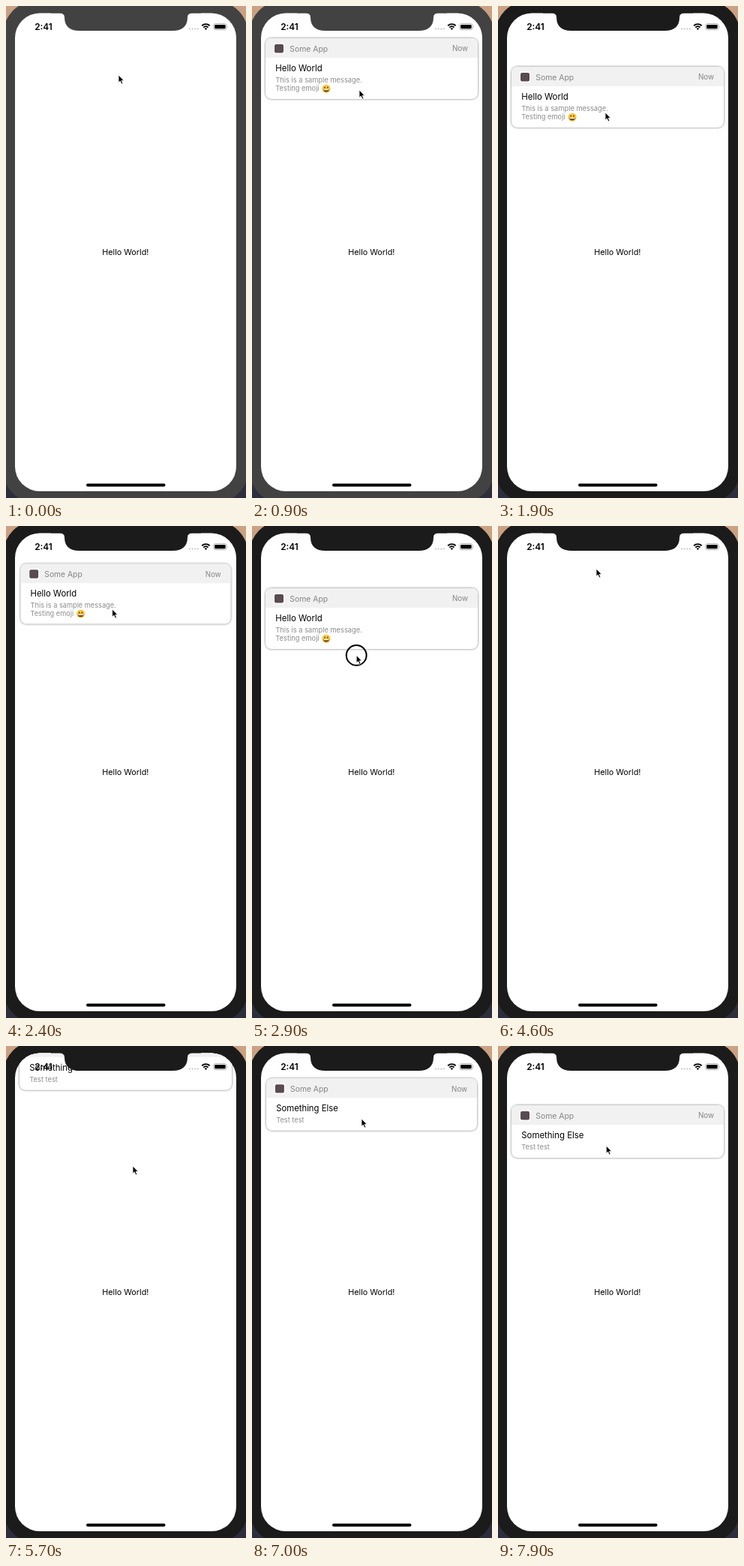
These frames come from a looping animation (320 px wide and 656 px high, 8 s). An HTML page:

```html
<!DOCTYPE html>
<html lang="en">
<head>
<meta charset="utf-8">
<title>Banner notification</title>
<style>
  html, body { margin: 0; width: 100%; height: 100%; overflow: hidden; background: #2b2d3c; }
  svg { display: block; width: 100vw; height: 100vh; }
  text { font-family: Inter, Roboto, sans-serif; font-size: 10.8px; fill: #000; }
  .clock { font-size: 11.8px; font-weight: 600; }
  .frame { fill: #424242; }
  .active .frame { fill: #1b1b1b; }
  .card { fill: #fff; filter: drop-shadow(0 0 1.8px rgba(0, 0, 0, .55)); }
  .head { fill: #f1f1f1; }
  .app { font-size: 10.4px; fill: #858585; }
  .now { font-size: 9.8px; fill: #858585; text-anchor: end; }
  .title { font-size: 11.4px; }
  .body { font-size: 9.3px; fill: #8c8c8c; }
</style>
</head>
<body>
<svg id="stage" viewBox="0 0 320 656">
  <defs>
    <linearGradient id="desk" x2="0" y2="1">
      <stop offset="0" stop-color="#cba283"/>
      <stop offset="1" stop-color="#2b2d3c"/>
    </linearGradient>
    <clipPath id="screen"><rect x="12" y="9.5" width="295" height="637.5" rx="33"/></clipPath>
  </defs>

  <rect width="320" height="656" fill="url(#desk)"/>
  <rect class="frame" x="-4" y="-7" width="327" height="670" rx="45"/>
  <g clip-path="url(#screen)">
    <rect width="320" height="656" fill="#fff"/>
    <text x="159.3" y="332" text-anchor="middle">Hello World!</text>
    <g id="banners"></g>

    <text class="clock" x="50" y="31.7" text-anchor="middle">2:41</text>
    <path d="M245 30.5h11.4" stroke="#bdbdbd" stroke-width="2" stroke-linecap="round" stroke-dasharray="0 3.6"/>
    <g fill="none" stroke="#000" stroke-width="1.9">
      <path d="M261.2 26.3a7.4 7.4 0 0 1 10.4 0"/>
      <path d="M263.3 28.6a4.4 4.4 0 0 1 6.2 0"/>
    </g>
    <path d="M266.4 32l-1.8-1.9a2.6 2.6 0 0 1 3.6 0z"/>
    <rect x="276.9" y="23.6" width="17" height="8" rx="2.3" fill="none" stroke="#a5a5a5" stroke-width=".9"/>
    <rect x="278.2" y="24.9" width="14.4" height="5.4" rx="1.3"/>
    <path d="M295 26.2q1.4 1.4 0 2.8z" fill="#a5a5a5"/>
    <rect x="107" y="636.8" width="105.5" height="4" rx="2"/>
  </g>
  <path class="frame" d="M60 4H260V9.5H249Q242 9.5 242 15C242 27 235 33 222 33H98C85 33 78 27 78 15Q78 9.5 71 9.5H60Z"/>

  <g id="pointer">
    <circle id="ring" r="13.4" fill="none" stroke="#000" stroke-width="2"/>
    <path d="M0 0V10.2L2.3 8.1L4 12L5.8 11.2L4.1 7.4H7.2Z" stroke="#fff" stroke-width=".8" stroke-linejoin="round"/>
  </g>
</svg>
<script>
const LOOP = 8000, STEP = 100, REST_TOP = 43, MAX_PULL = 40;
const $ = id => document.getElementById(id);
const clamp = (v, lo, hi) => Math.min(hi, Math.max(lo, v));
const ramp = (t, from, length) => clamp((t - from) / length, 0, 1);
const easeOut = p => 1 - (1 - p) ** 3;

const glides = [
  { at: 400, length: 500, x: 143, y: 112 },
  { at: 900, length: 400, x: 143, y: 104 },
  { at: 1300, length: 900, x: 143, y: 161 },
  { at: 2200, length: 300, x: 141, y: 86 },
  { at: 2600, length: 500, x: 138, y: 230 },
  { at: 3200, length: 700, x: 134, y: 84 },
  { at: 4000, length: 300, x: 131, y: 57 },
  { at: 5200, length: 400, x: 169, y: 160 },
  { at: 6000, length: 400, x: 146, y: 97 },
  { at: 7300, length: 700, x: 144, y: 139 },
];

function pointerAt(t) {
  return glides.reduce((p, { at, length, x, y }) => {
    const k = ramp(t, at, length);
    return { x: p.x + (x - p.x) * k, y: p.y + (y - p.y) * k };
  }, { x: 150, y: 92 });
}

const smile = `<g transform="translate(99 67.3)">
  <circle r="5.6" fill="#fbc83c"/>
  <ellipse cx="-1.9" cy="-1.7" rx=".8" ry="1.2" fill="#5b3a17"/>
  <ellipse cx="1.9" cy="-1.7" rx=".8" ry="1.2" fill="#5b3a17"/>
  <path d="M-3.8 .7H3.8A3.8 3.6 0 0 1-3.8 .7Z" fill="#6b3d18"/>
  <path d="M-3.4 .8H3.4L3 2H-3Z" fill="#fff"/>
</g>`;

function addBanner(height, title, lines, extra = '') {
  const node = document.createElementNS('http://www.w3.org/2000/svg', 'g');
  node.innerHTML = `
    <rect class="card" x="18" width="283" height="${height}" rx="8"/>
    <path class="head" d="M18 26V8Q18 0 26 0H293Q301 0 301 8V26Z"/>
    <rect x="28.5" y="6.5" width="15" height="14.5" rx="3" fill="#fff"/>
    <rect x="30" y="8" width="12" height="11.5" rx="2" fill="#594b52"/>
    <text class="app" x="50.3" y="17.5">Some App</text>
    <text class="now" x="288" y="17.4">Now</text>
    <text class="title" x="31.3" y="43.8">${title}</text>
    ${lines.map((line, i) => `<text class="body" x="31.3" y="${59.4 + 11 * i}">${line}</text>`).join('')}
    ${extra}`;
  $('banners').append(node);
  return { node, height };
}

const banners = [
  {
    ...addBanner(81, 'Hello World', ['This is a sample message.', 'Testing emoji'], smile),
    enter: 480, leave: 4200,
    drags: [{ from: 1300, to: 3200 }, { from: 4000, to: 4800 }],
  },
  {
    ...addBanner(70, 'Something Else', ['Test test']),
    enter: 5620, leave: LOOP,
    drags: [{ from: 7300, to: LOOP }],
  },
];

// The card follows the pointer one to one, up to a limit, then settles back.
function dragState({ from, to }, t) {
  const held = 1 - easeOut(ramp(t, to, 300));
  const moved = pointerAt(clamp(t, from, to)).y - pointerAt(from).y;
  const pull = Math.min(moved, MAX_PULL) * held;
  const press = ramp(t, from - 400, 200) * held * (1 - clamp(pull / 20, 0, 1));
  return { pull, press };
}

function place({ node, height, enter, leave, drags }, t) {
  const travel = REST_TOP + height + 5, cy = height / 2;
  let top = REST_TOP - travel * (1 - easeOut(ramp(t, enter, 350)) + ramp(t, leave, 400));
  let scale = 1;
  for (const drag of drags) {
    const { pull, press } = dragState(drag, t);
    top += pull;
    scale -= .015 * press;
  }
  node.setAttribute('transform',
    `translate(159.5 ${top + cy}) scale(${scale}) translate(-159.5 ${-cy})`);
}

const ringShown = t => (t >= 2500 && t <= 3200) || (t >= 3800 && t <= 4300);

function tick() {
  // The small lead keeps a step from arriving late through rounding.
  const t = Math.floor((performance.now() + 20) % LOOP / STEP) * STEP;
  const { x, y } = pointerAt(t);
  $('stage').classList.toggle('active', t >= 1400);
  banners.forEach(banner => place(banner, t));
  $('pointer').setAttribute('transform', `translate(${x} ${y})`);
  $('ring').style.display = ringShown(t) ? '' : 'none';
  requestAnimationFrame(tick);
}
tick();
</script>
</body>
</html>
```
